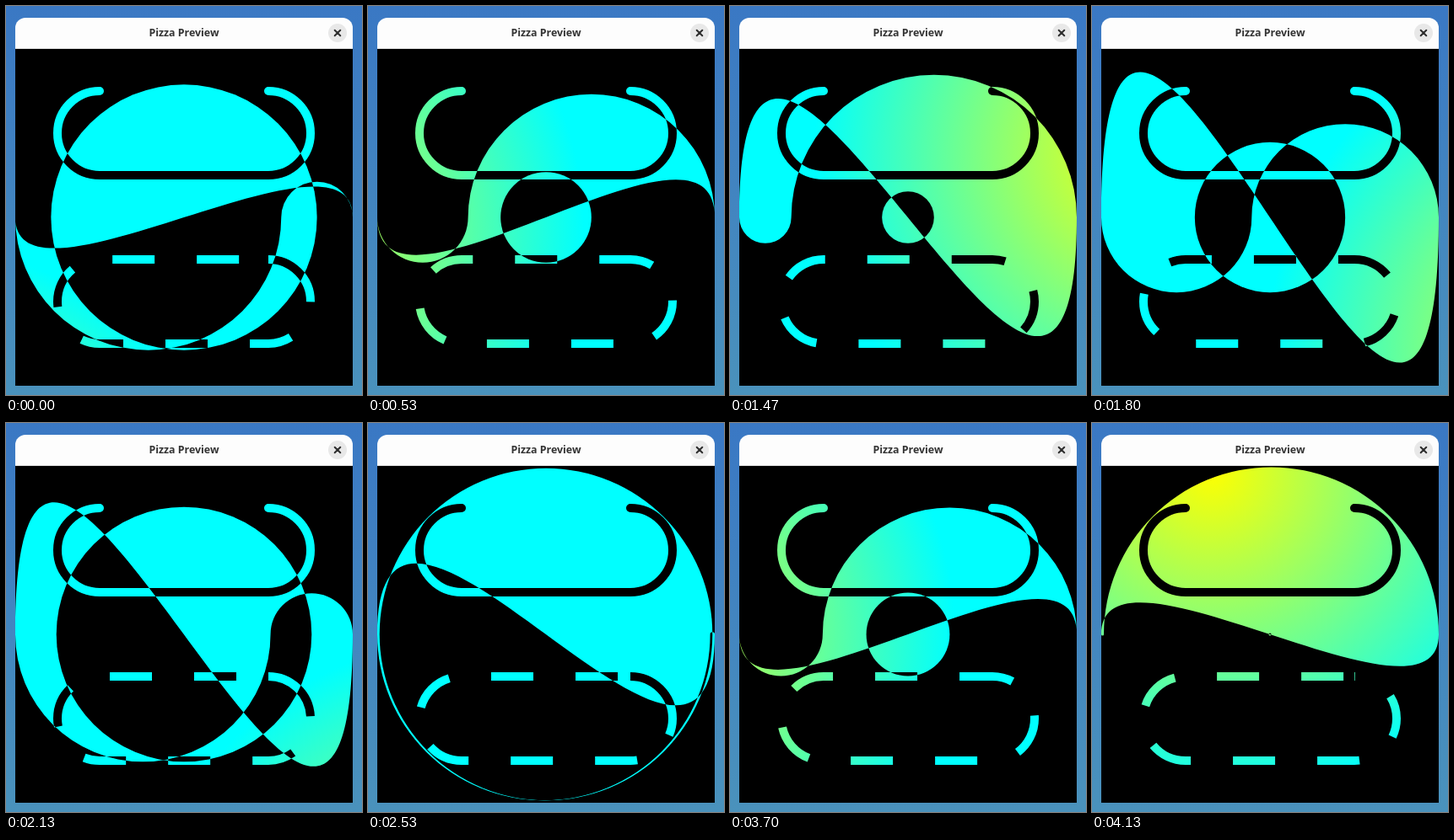
An HTML page with a canvas for the animation above (4.16 s loop, 422 px wide and 462 px high).

```html
<!DOCTYPE html>
<html lang="en">
<head>
<meta charset="utf-8">
<title>Pizza Preview</title>
<style>
  html, body { margin: 0; width: 422px; height: 462px; overflow: hidden; }
  body { position: relative; background: linear-gradient(#3a78c4, #4a92bc); }
  header {
    position: absolute; left: 11px; top: 14px; width: 400px; height: 37px;
    border-radius: 12px 12px 0 0; background: #fdfdfd;
    box-shadow: inset 0 -1px #e2e2e2;
    font: bold 12.4px/36px "Noto Sans", "Open Sans", sans-serif;
    color: #333; text-align: center;
  }
  svg { position: absolute; left: 371px; top: 7px; }
  canvas { position: absolute; left: 11px; top: 51px; background: #000; }
</style>
</head>
<body>
<header>Pizza Preview
  <svg width="22" height="22"><circle cx="11" cy="11" r="11" fill="#e8e8e8"/><path d="M7.7 7.7l6.6 6.6m0-6.6l-6.6 6.6" stroke="#2e2e2e" stroke-width="2" stroke-linecap="round"/></svg>
</header>
<canvas width="400" height="400"></canvas>
<script>
const LOOP = 4160, FPS = 30, PI = Math.PI;
const g = document.querySelector('canvas').getContext('2d');

function disc(r) {
  g.beginPath();
  g.arc(200, 200, r, 0, 2 * PI);
  g.fill();
}

// S-curve closed by two half circles that always add up to the full width
function wave(r, bend) {
  g.beginPath();
  g.moveTo(0, 200);
  g.bezierCurveTo(0, bend, 400, 400 - bend, 400, 200);
  g.arc(200 + r, 200, 200 - r, 0, PI, true);
  g.arc(r, 200, r, 0, PI);
  g.fill();
}

function pill(y, cap, dash, closed) {
  g.lineCap = cap;
  g.setLineDash(dash);
  g.beginPath();
  g.arc(300, y, 50, -PI / 2, PI / 2);
  g.arc(100, y, 50, PI / 2, PI * 1.5);
  if (closed) g.closePath();
  g.stroke();
}

function glow(x, y) {
  const fill = g.createRadialGradient(x, y, 0, x, y, 400);
  fill.addColorStop(0, '#ff0');
  fill.addColorStop(1, '#0ff');
  return fill;
}

function draw(s) {
  // slight uneven pacing in the first half
  const drift = s < 2.13 ? .032 * Math.sin(PI * (s - .533) / 1.6) : 0;
  const a = 2.555 + 2 * s + drift;
  const sin = Math.sin(a), cos = Math.cos(a), r = 100 + 100 * sin;

  g.globalCompositeOperation = 'source-over';
  g.clearRect(0, 0, 400, 400);
  g.globalCompositeOperation = 'xor';
  g.fillStyle = g.strokeStyle = '#fff';
  g.lineWidth = 10;
  disc(r);
  wave(r, -400 * cos);
  pill(100, 'round', [], false);
  // only the first dash grows and shrinks; the rest follow it
  pill(300, 'butt', [r / 2, ...Array(15).fill(50)], true);

  g.globalCompositeOperation = 'source-in';
  g.fillStyle = glow(200 + 400 * cos, 400 + 400 * sin);
  g.fillRect(0, 0, 400, 400);
}

const start = performance.now();
function tick() {
  const ms = (performance.now() - start) % LOOP;
  const step = Math.floor((Math.floor(ms / 10) + .5) * FPS / 100);
  draw(step / FPS);
  requestAnimationFrame(tick);
}
tick();
</script>
</body>
</html>
```
